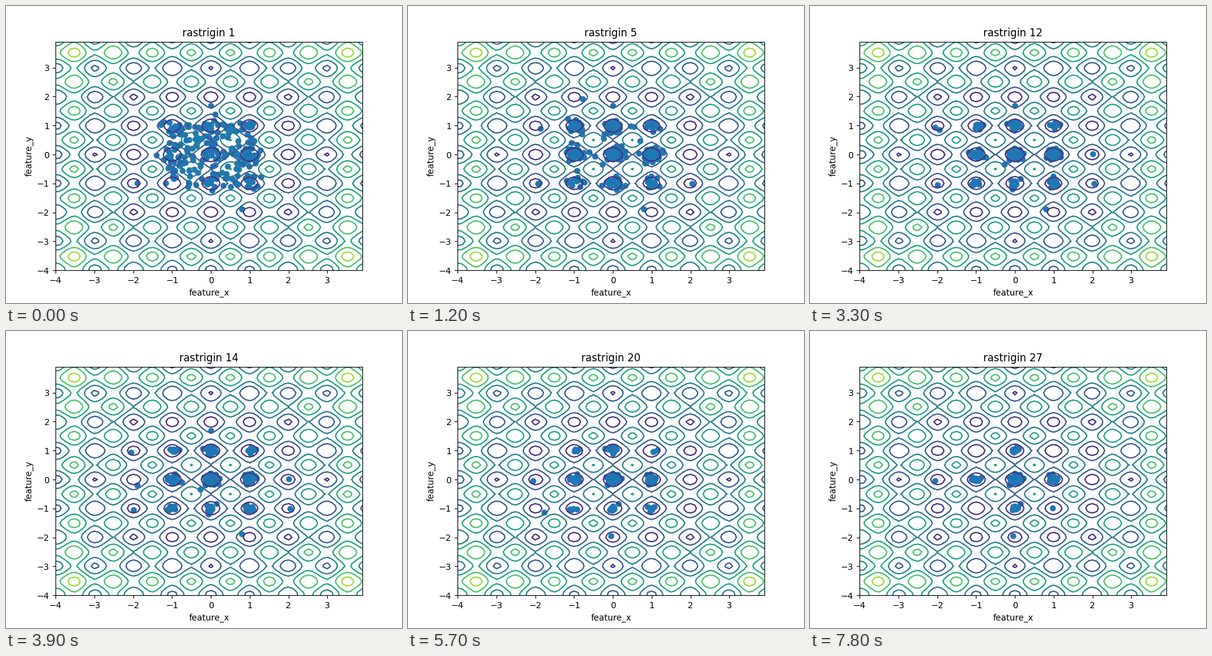
Animation of 640x480 px, one loop 8 s. Source, as a matplotlib script:

```python
import numpy as np
import matplotlib.pyplot as plt
from matplotlib.animation import FuncAnimation

GENERATIONS = 27
TICKS_PER_GENERATION = 3
POPULATION = 250
SCOUTS = 8
SCOUT_LIFE = 4

# Long-lived outliers: x, y, first and last generation.
OUTLIERS = [
    (0, 1.69, 1, 14), (0.8, -1.88, 1, 14),
    (-0.79, 1.92, 3, 10), (2.03, -1, 4, 14),
    (2, 0.02, 7, 19), (-2.05, 0.94, 11, 19),
    (-2.05, -0.05, 15, 27), (-0.05, -1.95, 15, 27),
]


def rastrigin(x, y):
    return 20 + x**2 - 10 * np.cos(2 * np.pi * x) + y**2 - 10 * np.cos(2 * np.pi * y)


def evolve(rng):
    """Return the population's positions for every generation."""
    pos = rng.uniform(-1.12, 1.12, (POPULATION, 2))
    home = np.round(pos)
    # Corner wells empty first, the upper ones sooner; side wells drain slowly.
    in_corner = home.all(axis=1)
    leave_at = rng.uniform(3, np.where(in_corner, 27 - 2 * home[:, 1], 70))
    history = []
    for gen in range(1, GENERATIONS + 1):
        leaving = (leave_at <= gen) & home.any(axis=1)
        home[leaving] = 0
        spread = 0.05 + 0.17 * np.exp(-(gen - 1) / 6)
        trial = home + spread * rng.normal(size=pos.shape).clip(-1.8, 1.8)
        cost = rastrigin(*pos.T)
        tried = rng.random(POPULATION) < np.where(cost > 10, 0.4, 0.1)
        accepted = leaving | (tried & (rastrigin(*trial.T) < cost))
        pos = np.where(accepted[:, None], trial, pos)
        history.append(pos)
    return history


def spawn_scouts(rng):
    """Short-lived individuals that visit the wells along the left edge."""
    births = np.linspace(1, 16, SCOUTS).astype(int)
    x = rng.normal(-1.9, 0.1, SCOUTS)
    y = rng.integers(-1, 2, SCOUTS) + rng.normal(0, 0.1, SCOUTS)
    return list(zip(x, y, births, births + SCOUT_LIFE))


def points_at(gen):
    loners = [(x, y) for x, y, first, last in OUTLIERS + scouts if first <= gen <= last]
    return np.vstack([history[gen - 1], loners])


history = evolve(np.random.default_rng(4))
scouts = spawn_scouts(np.random.default_rng(7))

fig, ax = plt.subplots(figsize=(6.4, 4.8), dpi=100)
axis = np.arange(-40, 40) / 10
X, Y = np.meshgrid(axis, axis)
ax.contour(X, Y, rastrigin(X, Y), levels=np.arange(0, 71, 10))
dots = ax.scatter(*points_at(1).T, color="tab:blue")
ax.set(xlim=(-4, 3.9), ylim=(-4, 3.9), xlabel="feature_x", ylabel="feature_y")
title = ax.set_title("rastrigin 1")


def update(tick):
    gen = 1 + tick // TICKS_PER_GENERATION
    dots.set_offsets(points_at(gen))
    title.set_text(f"rastrigin {gen}")
    return dots, title


anim = FuncAnimation(fig, update, frames=80, interval=100, repeat=True, repeat_delay=0)
plt.show()
```
